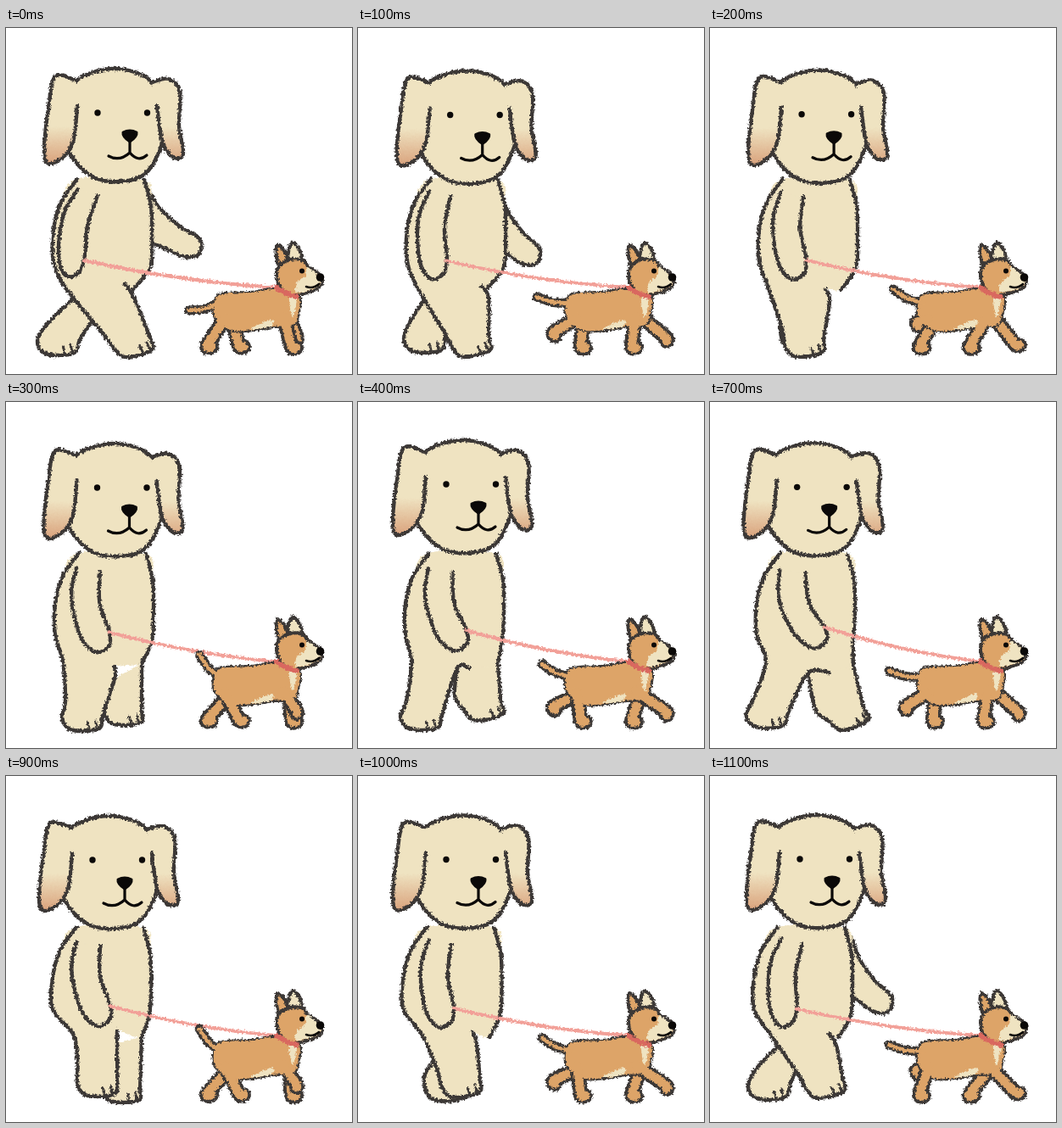
An HTML page for the animation above (1.2 s loop, 408x408 px).

```html
<!DOCTYPE html>
<html lang="en">
<head>
<meta charset="utf-8">
<title>Walking the dog</title>
<style>
html, body { margin: 0; width: 100%; height: 100%; overflow: hidden; background: #fff; }
svg { display: block; width: 100vw; height: 100vh; }
path { stroke-linecap: round; stroke-linejoin: round; }
</style>
</head>
<body>
<svg viewBox="0 0 408 408">
  <defs>
    <filter id="crayon" filterUnits="userSpaceOnUse" x="0" y="0" width="408" height="408" color-interpolation-filters="sRGB">
      <feTurbulence id="grain" type="fractalNoise" baseFrequency=".4" numOctaves="2"/>
      <feDisplacementMap in="SourceGraphic" scale="5" xChannelSelector="R" yChannelSelector="G"/>
    </filter>
    <linearGradient id="ear" gradientUnits="userSpaceOnUse" x1="0" y1="116" x2="0" y2="160">
      <stop stop-color="#efe3c1"/><stop offset="1" stop-color="#d9a27c"/>
    </linearGradient>
  </defs>
  <g id="rough" filter="url(#crayon)"></g>
  <g id="ink"></g>
</svg>
<script>
const STEP = 100, STEPS = 12;
const INK = '#3c3836', CREAM = '#efe3c1', TAN = '#dda468', BLACK = '#0b0908';

const lerp = (a, b, t) => a + (b - a) * t;
const mix = (a, b, t) => a.map((v, i) => lerp(v, b[i], t));
const clamp = (v, lo = 0, hi = 1) => Math.max(lo, Math.min(hi, v));
const pairs = a => a.flatMap((v, i) => i % 2 ? [] : [[v, a[i + 1]]]);

// A value set at the key steps and blended between them.
const KEYS = [0, 1, 3, 4, 6, 9, 11, STEPS];
const track = (...v) => step => {
  const i = KEYS.findLastIndex(k => k <= step);
  return lerp(v[i], v[(i + 1) % v.length], (step - KEYS[i]) / (KEYS[i + 1] - KEYS[i]));
};
const headX = track(0, .7, -.5, -4, -5, -6, -2);
const headY = track(0, 2.5, 1, -3, 1, -1, -2);
const armSwing = track(0, .25, .6, .72, 1, .62, .2);
const lean = track(0, 2, 2, 0, -1, -1, -4);
const hipX = track(70, 70, 67, 63, 59, 80, 72);
const nearX = track(150, 134, 90, 74, 46, 108, 136);
const nearY = track(371, 371, 372, 371, 372, 362, 363);
const farX = track(61, 78, 139, 149, 177, 137, 69);
const farY = track(370, 367, 365, 359, 369, 369, 366);
const crotchX = track(150, 154, 128, 117, 108, 131, 149);
const crotchY = track(316, 318, 326, 314, 322, 314, 318);

// Smooth curve through a flat list of points.
function curve(list, closed) {
  const p = pairs(list), n = p.length;
  const at = i => closed ? p[(i + n) % n] : p[clamp(i, 0, n - 1)];
  let d = 'M' + p[0];
  for (let i = 0; i < (closed ? n : n - 1); i++) {
    const [a, b, c, e] = [at(i - 1), at(i), at(i + 1), at(i + 2)];
    d += `C${b.map((v, k) => v + (c[k] - a[k]) / 6)} ${c.map((v, k) => v - (e[k] - b[k]) / 6)} ${c}`;
  }
  return d + (closed ? 'Z' : '');
}

const draw = (d, fill = 'none', stroke = INK, width = 4.4) =>
  `<path d="${d}" fill="${fill}" stroke="${stroke}" stroke-width="${width}"/>`;
const patch = (list, color) => draw(curve(list, true), color, 'none');
const dot = (x, y, r) => `<circle cx="${x}" cy="${y}" r="${r}" fill="${BLACK}"/>`;

// Foot outline from the back of the ankle round the sole to the front.
function foot(x, y, angle) {
  const shear = (110 - x) / 5, c = Math.cos(angle), s = Math.sin(angle);
  return pairs([-24 + shear, -19, -24, 0, -16, 13, 3, 16, 21, 12, 23 + shear / 3, -3])
    .flatMap(([u, v]) => [x + u * c - v * s, y + u * s + v * c]);
}

// Two short strokes pointing inwards from the sole.
function toes(outline) {
  const a = outline.slice(6, 8), b = outline.slice(8, 10);
  const dx = b[0] - a[0], dy = b[1] - a[1], k = 9 / Math.hypot(dx, dy);
  return [.3, .8].map(t => {
    const [x, y] = mix(a, b, t);
    return draw(`M${x},${y}l${dy * k},${-dx * k}`, 'none', INK, 3);
  }).join('');
}

function nearArm(step) {
  const t = armSwing(step), drop = 24 * t * (1 - t);
  const arm = mix(
    [85,190, 70,214, 63,245, 63,276, 72,293, 86,288, 93,268, 96,234, 108,197],
    [82,199, 82,228, 91,252, 108,274, 130,287, 145,277, 141,262, 120,238, 113,202], t)
    .map((v, i) => i % 2 && i > 6 && i < 14 ? v + drop : v);
  return { arm, hand: [lerp(92, 141, t), lerp(274, 262, t) + drop * .8] };
}

function walkerBody(step, arm) {
  const c = Math.cos(2 * Math.PI * step / STEPS), tilt = lean(step);
  const sway = list => list.map((v, i) => i % 2 ? v : v + tilt);
  const near = foot(nearX(step), nearY(step), -.25 * Math.max(0, c));
  const far = foot(farX(step), farY(step), -.4 * Math.max(0, -c));
  const crotch = [crotchX(step), crotchY(step)];
  const hook = [crotch[0] - c * (c < 0 ? 29 : 10), crotch[1] - 14 * clamp(1 + 2 * c)];
  const hip = [160 - 10 * c, 308];
  const back = [...sway([84,178, 65,205, 56,238, 56,275]), hipX(step), 306, ...near, ...crotch, ...hook];
  const front = [...sway([163,179, 171,210, 172,248, 170,282]), ...hip];
  const behind = clamp(c / .87);
  const farLeg = [...mix(crotch, [79, 319], behind), ...far, ...mix(hip, [104, 342], behind)];
  const swing = Math.min(1.2, 1.6 * (1 - c)) * 180 / Math.PI;
  return `<g transform="rotate(${swing} 165 190)">` +
    draw(curve([167,190, 182,213, 205,234, 228,248, 228,266, 212,270, 192,262, 165,250]), CREAM) + '</g>' +
    draw(curve(farLeg), CREAM) + toes(far) +
    patch([...back, ...pairs(front).reverse().flat()], CREAM) +
    draw(curve(back)) + draw(curve(front)) + toes(near) + draw(curve(arm), CREAM);
}

const walkerHead =
  draw(curve([83,62, 128,48, 172,64, 188,115, 168,168, 133,181, 98,173, 72,140, 72,95], true), CREAM) +
  draw(curve([84,92, 80,130, 70,150, 51,160, 45,145, 50,95, 58,57, 83,62]), 'url(#ear)') +
  draw(curve([178,92, 184,133, 195,151, 206,153, 209,144, 204,115, 205,75, 192,60, 172,64]), 'url(#ear)');

const walkerFace = dot(108, 100, 3.7) + dot(166.5, 100, 3.7) +
  draw('M138,123Q146,119 154,123Q155,128 146,134Q137,128 138,123Z', BLACK, BLACK, 3) +
  draw('M146,132V147M121,151Q134,158 146,147Q156,159 166,150', 'none', BLACK, 3.2);

// Puppy paws over one stride; the other leg of a pair is half a stride away.
const hindPaw = [[275,375], [263,376], [247,376], [237,375], [231,359], [244,347]];
const forePaw = [[342,363], [363,365], [360,373], [337,376], [323,376], [306,376]];
const tailTip = [[216,333], [211,317], [216,308], [228,298], [217,309], [211,317]];

function leg(hip, [x, y]) {
  const toe = y < 370 ? [x + 1, y + 4] : [x + 5, y + 1];
  return curve([...hip, ...mix(hip, [x, y], .5), x, y, ...toe]);
}

function puppyBody(step) {
  const i = step % 6, j = (i + 3) % 6;
  const farLegs = leg([266, 342], hindPaw[i]) + leg([334, 340], forePaw[i]);
  const nearLegs = leg([258, 342], hindPaw[j]) + leg([327, 340], forePaw[j]);
  const root = [252, 324], [mx, my] = mix(root, tailTip[i], .5);
  const tail = curve([...root, mx - 1, my + 3, ...tailTip[i]]);
  const torso = curve([248,318, 262,313, 290,312, 318,308, 345,316, 344,338, 338,350, 314,352, 290,356, 264,356, 246,340], true);
  const dark = d => draw(d, 'none', INK, 18), light = d => draw(d, 'none', TAN, 10.5);
  return dark(farLegs) + light(farLegs) +
    draw(tail, 'none', INK, 11) + draw(torso) + dark(nearLegs) +
    draw(torso, TAN, 'none') + draw(tail, 'none', TAN, 4.5) + light(nearLegs) +
    patch([288,355, 313,344, 312,352], CREAM) + patch([334,318, 343,317, 338,341], CREAM);
}

const puppyHead =
  draw('M322,282Q316,262 320,256Q328,258 333,274', TAN, INK, 4) +
  draw('M332,274Q333,256 338,253Q347,257 350,274', CREAM, INK, 4) +
  draw(curve([321,282, 335,273, 350,274, 357,282, 369,290, 373,299, 366,308, 342,315, 328,311, 320,298], true), TAN, INK, 4) +
  patch([355,282, 353,292, 343,301, 343,312, 365,306, 371,298, 367,291], CREAM) +
  draw('M319,306Q329,314 343,317', 'none', '#d9685f', 6);

const puppyFace = dot(349, 286.5, 3) + dot(370.5, 294, 4.8) +
  draw('M354,305Q362,308 369,302', 'none', BLACK, 2.6);

const [grain, rough, ink] = ['grain', 'rough', 'ink'].map(id => document.getElementById(id));

function render(step) {
  const { arm, hand: [x, y] } = nearArm(step);
  const bob = s => `<g transform="translate(${headX(step)} ${headY(step)})">${s}</g>`;
  const leash = `M${x},${y}Q${(x + 318) / 2},${(y + 306) / 2 + 9} 318,306`;
  grain.setAttribute('seed', step + 1);
  rough.innerHTML = walkerBody(step, arm) + bob(walkerHead) +
    draw(leash, 'none', '#f2a098', 4) + puppyBody(step) + puppyHead;
  ink.innerHTML = bob(walkerFace) + puppyFace;
}

const start = performance.now();
let shown = -1;
function tick() {
  const step = Math.floor((performance.now() - start) / STEP) % STEPS;
  if (step !== shown) render(shown = step);
  requestAnimationFrame(tick);
}
tick();
</script>
</body>
</html>
```
